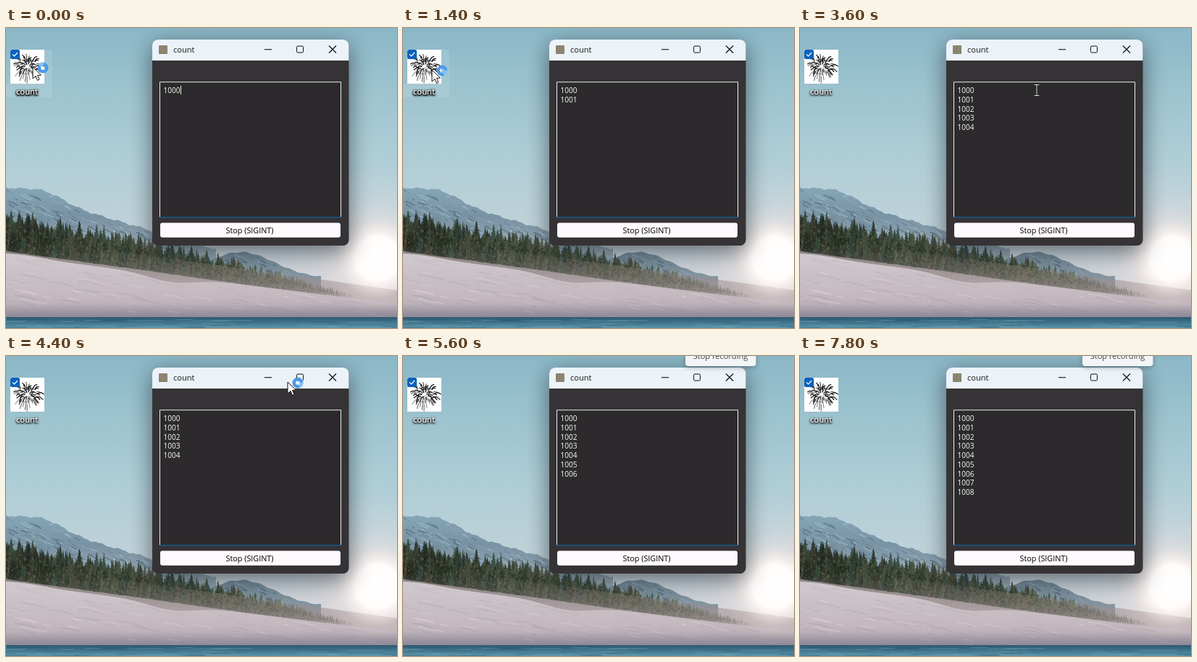
Write an HTML page with a canvas that moves like this. It is 540 px wide and 415 px high and loops after 8 s.

```html
<!DOCTYPE html>
<html lang="en">
<head>
<meta charset="utf-8">
<title>count</title>
<style>
html, body { margin: 0; width: 100%; height: 100%; overflow: hidden; background: #a5c6d0; }
canvas { display: block; width: 540px; height: 415px; }
</style>
</head>
<body>
<canvas id="stage" width="540" height="415"></canvas>
<script>
const W = 540, H = 415, LOOP = 8000, STEP = 200;
const UI = '"Open Sans", "Noto Sans", sans-serif';
const stage = document.getElementById('stage').getContext('2d');
const scene = document.createElement('canvas');
scene.width = W;
scene.height = H;
let g = scene.getContext('2d');

let seed = 11;
function rnd(a = 0, b = 1) {
  seed = (seed * 16807) % 2147483647;
  return a + (b - a) * seed / 2147483647;
}

const bump = (x, center, width) => Math.exp(-(((x - center) / width) ** 2));

function fade(y0, y1, ...colors) {
  const grad = g.createLinearGradient(0, y0, 0, y1);
  colors.forEach((c, i) => grad.addColorStop(i / (colors.length - 1), c));
  return grad;
}

function glow(x, y, r, ...stops) {
  const grad = g.createRadialGradient(x, y, 0, x, y, r);
  stops.forEach(([k, c]) => grad.addColorStop(k, c));
  g.fillStyle = grad;
  g.fillRect(x - r, y - r, 2 * r, 2 * r);
}

function box(x, y, w, h, r, fill, line) {
  g.beginPath();
  g.roundRect(x, y, w, h, r);
  if (fill) { g.fillStyle = fill; g.fill(); }
  if (line) { g.strokeStyle = line; g.lineWidth = 1; g.stroke(); }
}

function stroke(color, width, ...pts) {
  g.strokeStyle = color;
  g.lineWidth = width;
  g.beginPath();
  pts.forEach(p => g.lineTo(...p));
  g.stroke();
}

function shadow(color = 'transparent', blur = 0, dy = 0) {
  g.shadowColor = color;
  g.shadowBlur = blur;
  g.shadowOffsetY = dy;
}

function label(text, x, y, size, color, align = 'left') {
  g.font = '500 ' + size + 'px ' + UI;
  g.textAlign = align;
  g.fillStyle = color;
  g.fillText(text, x, y);
}

// Height of each ridge line at x
const peaks = x => 222 + .29 * x - 12 * bump(x, 52, 38) + Math.sin(x * .23) + Math.sin(x * .6) * .5;
const hill = x => 346 - 36 * bump(x, 324, 66) + Math.sin(x * .3) * .7;
const roots = x => 309 + .14 * x;
const snow = x => 314 + .125 * x - 3 * bump(x, 25, 40) + 9 * bump(x, 228, 45);

// Area between a ridge line and a flat bottom
function land(ridge, x0, x1, bottom, fill) {
  g.beginPath();
  g.moveTo(x0, bottom);
  for (let x = x0; x <= x1; x++) g.lineTo(x, ridge(x));
  g.lineTo(x1, bottom);
  g.fillStyle = fill;
  g.fill();
}

// Slanted streaks of light and shade below a ridge line
function streaks(ridge, x0, x1, n, depth, slope, len, colors) {
  for (let i = 0; i < n; i++) {
    const x = rnd(x0, x1), y = ridge(x) + 3 + rnd(0, depth), l = rnd(3, len);
    stroke(colors[i % colors.length], rnd(.6, 2), [x, y], [x + l * .5, y + l * slope * rnd(.2, .7)], [x + l, y + l * slope]);
  }
}

function tree(x, base, h) {
  const rows = Math.max(3, Math.round(h / 4)), w = h * rnd(.2, .32);
  const edge = side => Array.from({ length: rows }, (_, i) => {
    const k = (i + 1) / rows, y = base - h + h * k;
    return [[x + side * w * k * rnd(.6, 1.3), y + rnd(-1, 1)], [x + side * w * k * .4, y - 1]];
  });
  const pts = [[x, base - h], ...edge(1).flat(), ...edge(-1).reverse().flat()];
  g.fillStyle = `hsl(${rnd(60, 150)}, 13%, ${rnd(13, 25) + x * .035}%)`;
  g.beginPath();
  pts.forEach(p => g.lineTo(...p));
  g.fill();
}

function forest() {
  const tall = x => 52 * (1 - (x / 495) ** 2);
  for (let row = 0; row < 3; row++) {
    const scale = 1 - row * .2;
    for (let x = -4; x < 480; x += rnd(1.5, 4)) {
      tree(x, roots(x) - 4 + row * 2, tall(x) * scale * rnd(.65, 1.08));
    }
  }
  for (let i = 0; i < 1100; i++) {
    const x = rnd(0, 440), y = roots(x) - rnd(2, tall(x) * .75);
    const ink = i % 2 ? 'rgba(126,116,80,.4)' : 'rgba(22,30,28,.5)';
    stroke(ink, rnd(.8, 1.8), [x, y], [x + rnd(-3, 3), y + rnd(1, 4)]);
  }
}

function landscape() {
  g.fillStyle = fade(0, 350, '#8ab7c7', '#9dc3cf', '#aecdd6', '#bdd1d8', '#cfd2d7');
  g.fillRect(0, 0, W, H);
  glow(513, 319, 130, [0, 'rgba(255,243,238,.8)'], [.4, 'rgba(238,226,226,.4)'], [1, 'rgba(225,225,228,0)']);

  land(peaks, 0, 290, 330, fade(220, 300, '#86a6b6', '#7893a4', '#93a5b1'));
  streaks(peaks, 0, 240, 170, 38, .55, 15, ['rgba(64,91,111,.5)', 'rgba(180,200,210,.5)', 'rgba(90,118,138,.5)']);
  land(hill, 250, 435, 372, fade(310, 355, '#6f8795', '#8b99a3'));
  streaks(hill, 285, 400, 40, 16, .5, 12, ['rgba(60,80,95,.5)', 'rgba(168,183,192,.45)']);

  forest();
  land(x => roots(x) - 22, 0, W, 402, fade(300, 385, 'rgba(150,135,134,0)', 'rgba(150,135,136,.45)', 'rgba(190,174,178,.9)'));
  land(roots, 0, W, 402, fade(312, 402, '#8f8584', '#b0a3a6', '#b9abb0'));
  land(snow, 0, W, 402, fade(315, 402, '#cfc9ce', '#c9c0c6', '#c3b8be', '#aaa1aa'));
  streaks(snow, -20, W, 160, 64, .2, 36, ['rgba(230,223,226,.3)', 'rgba(146,138,152,.2)', 'rgba(168,155,164,.22)']);

  g.fillStyle = fade(382, 401, 'rgba(130,125,140,0)', 'rgba(121,123,140,.7)');
  g.fillRect(0, 382, W, 19);
  g.fillStyle = fade(400, 415, '#2d566d', '#41778f', '#5a93a6');
  g.fillRect(0, 400, W, 15);
  for (let i = 0; i < 45; i++) {
    const x = rnd(-30, W), y = rnd(403, 415);
    stroke(i % 2 ? 'rgba(130,178,190,.35)' : 'rgba(30,74,97,.3)', 1, [x, y], [x + rnd(15, 60), y]);
  }
  glow(513, 319, 74, [0, '#fff'], [.4, '#fffdfb'], [.52, 'rgba(255,247,243,.65)'], [.75, 'rgba(250,236,231,.2)'], [1, 'rgba(250,236,231,0)']);
}

function iconName() {
  shadow('#000', 3, 1);
  for (let i = 0; i < 3; i++) label('count', 29, 92, 11.3, '#fff', 'center');
  shadow();
}

function desktopIcon() {
  g.fillStyle = '#fff';
  g.fillRect(6, 30, 47, 47);
  g.save();
  g.beginPath();
  g.rect(6, 30, 47, 47);
  g.clip();
  for (let i = 0; i < 64; i++) {
    const a = i * 2.4, c = Math.cos(a), s = Math.sin(a);
    const r0 = rnd(2, 14), r1 = r0 + rnd(4, 10), mid = (r0 + r1) / 2;
    stroke('#111', rnd(.5, 1.4), [30 + c * r0, 53 + s * r0], [30 + c * mid, 52 + s * mid], [30 + c * r1, 53 + s * r1 + r1 * .08]);
  }
  g.restore();
  box(6, 30, 13, 13, 2.5, '#0b62bd');
  stroke('#fff', 1.2, [9, 36.5], [11.5, 39], [16, 34]);
  iconName();
}

function maximizeSign() {
  box(401.5, 25, 9, 9, 1.5, null, '#111');
}

function appWindow() {
  shadow('rgba(20,28,36,.6)', 32, 8);
  box(202, 16, 271.5, 285, 8, '#363336');
  shadow();
  box(202, 16, 271.5, 29, [8, 8, 0, 0], '#ebf3f9');
  box(211, 24, 12, 12, 1, '#8b8470');
  label('count', 231, 34, 11.1, '#1b1b1b');
  stroke('#111', 1.1, [357, 29.7], [367, 29.7]);
  stroke('#111', 1.2, [446, 24.5], [456, 34.5]);
  stroke('#111', 1.2, [456, 24.5], [446, 34.5]);
  maximizeSign();

  box(212, 74, 251, 188, 2, '#2c2a2c');
  stroke('#f0eff0', 1, [212.5, 262], [212.5, 74.8], [462.5, 74.8], [462.5, 262]);
  stroke('#12619f', 1.2, [212, 261.8], [463, 261.8]);
  box(213, 269.4, 249, 20.4, 3, '#fdf9fd');
  label('Stop (SIGINT)', 336.5, 284, 10.8, '#000', 'center');
}

// One layout choice: two columns, each cut into equal rows
function layout(col, row, cut, ...rows) {
  const x = 305.5 + col * 108, y = 58.5 + row * 75, gap = 4, left = 91 * cut;
  rows.forEach((n, side) => {
    const h = (62 - gap * (n - 1)) / n;
    for (let i = 0; i < n; i++) {
      box(x + side * (left + gap), y + i * (h + gap), side ? 91 - left : left, h, 3, '#cac7c9', '#8b898c');
    }
  });
}

function snapLayouts() {
  g.fillStyle = 'rgba(205,208,212,.55)';
  g.fillRect(384, 16, 44, 29);
  maximizeSign();
  shadow('rgba(0,0,0,.35)', 12, 4);
  box(292.5, 46, 227, 161, 8, '#dddcdd');
  shadow();
  layout(0, 0, .5, 1, 1);
  layout(1, 0, .6, 1, 1);
  layout(0, 1, .5, 1, 2);
  layout(1, 1, .5, 2, 2);
}

function tooltip() {
  shadow('rgba(0,0,0,.3)', 6, 2);
  box(390, -10, 97.5, 24, 4, '#f2f4f6');
  shadow();
  label('Stop recording', 438.5, 4, 11.1, '#454545', 'center');
}

function arrow(x, y) {
  g.beginPath();
  [[0, 0], [0, 16], [4, 12.5], [6.5, 18.5], [9, 17], [6.5, 11.5], [11.5, 11]].forEach(([dx, dy]) => g.lineTo(x + dx, y + dy));
  g.closePath();
  g.fillStyle = '#fff';
  g.fill();
  g.strokeStyle = '#111';
  g.lineWidth = 1;
  g.stroke();
}

function spinner(x, y, t) {
  const turn = t / 1000 * Math.PI * 2;
  const arc = (color, from, to) => {
    g.strokeStyle = color;
    g.beginPath();
    g.arc(x, y, 5.2, from, to);
    g.stroke();
  };
  g.lineWidth = 4.6;
  arc('#4a9ae8', 0, 7);
  arc('#8cc2f3', turn - 2.6, turn - 1.3);
}

function beam(x, y) {
  for (const [color, w] of [['#111', 2.4], ['#eee', 1]]) {
    stroke(color, w, [x, y - 7], [x, y + 7]);
    for (const end of [-7.5, 7.5]) stroke(color, w, [x - 3.5, y + end], [x + 3.5, y + end]);
  }
}

// Rest on the icon, glide into the text, then up and off the top: [time, x, y]
const path = [[0, 37, 54], [1400, 40, 58], [2200, 163, 69], [3600, 327, 86], [4800, 420, 11], [5000, 432, -24]];

function pointer(t) {
  const i = path.findIndex(p => p[0] > t);
  if (i < 0) return;
  const [t0, x0, y0] = path[i - 1], [t1, x1, y1] = path[i], k = (t - t0) / (t1 - t0);
  const x = x0 + (x1 - x0) * k, y = y0 + (y1 - y0) * k;
  if (x > 213 && x < 462 && y > 75 && y < 262) return beam(x, y);
  spinner(x + 14, y + 1, t);
  arrow(x, y);
}

landscape();
desktopIcon();
appWindow();
g = stage;

function draw(t) {
  g.drawImage(scene, 0, 0);
  if (t < 1600) {
    g.fillStyle = 'rgba(225,240,245,.14)';
    g.fillRect(53, 30, 11, 47);
    g.fillRect(0, 77, 64, 19);
    iconName();
  }
  const lines = 1 + Math.floor((t + 400) / 1000);
  for (let i = 0; i < lines; i++) label(1000 + i, 217.5, 90 + i * 12.75, 10.1, '#fbfcf4');
  if (t < 400) stroke('#f0f0d8', 1, [241.5, 80], [241.5, 92]);
  if (t >= 4600 && t < 5200) snapLayouts();
  if (t >= 5600) tooltip();
  pointer(t);
}

function frame(now) {
  draw(Math.floor(now % LOOP / STEP) * STEP);
  requestAnimationFrame(frame);
}
requestAnimationFrame(frame);
</script>
</body>
</html>
```
